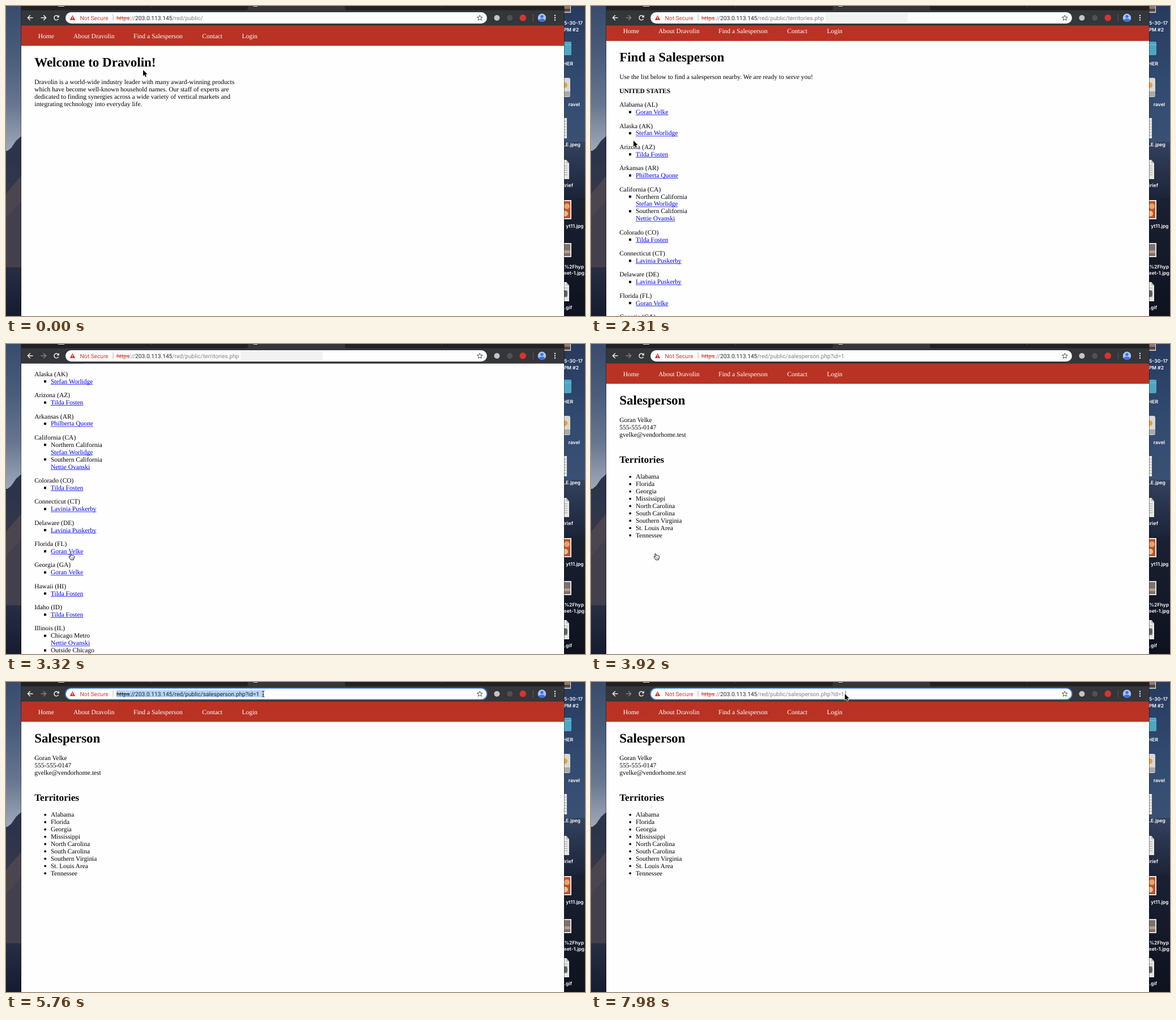
These frames come from a looping animation (1022 by 548 pixels, 8 s). An HTML page with a canvas:

```html
<!DOCTYPE html>
<html lang="en">
<head>
<meta charset="utf-8">
<title>Sales site</title>
<style>
html, body { margin: 0; width: 100%; height: 100%; overflow: hidden; background: #222b3f; }
canvas { display: block; width: 1022px; height: 548px; }
</style>
</head>
<body>
<canvas id="stage"></canvas>
<script>
const W = 1022, H = 548, LOOP = 8000;
const canvas = document.getElementById('stage');
const ctx = canvas.getContext('2d');
const dpr = window.devicePixelRatio || 1;
canvas.width = W * dpr;
canvas.height = H * dpr;

const SERIF = '"Liberation Serif", "Times New Roman", serif';
const UI = 'Roboto, sans-serif';
const LABEL = 'Inter, sans-serif';
const BODY = 11.49, LINE = 12.93, GAP = 11.49;
const FIRM = 'Dravolin';
const HOST = '203.0.113.145';
const A = 'Goran Velke', B = 'Stefan Worlidge', C = 'Tilda Fosten',
      D = 'Philberta Quone', E = 'Nettie Ovanski', F = 'Lavinia Puskerby';

// State, then pairs of person and optional district
const states = [
  ['Alabama (AL)', A], ['Alaska (AK)', B], ['Arizona (AZ)', C], ['Arkansas (AR)', D],
  ['California (CA)', B, 'Northern California', E, 'Southern California'],
  ['Colorado (CO)', C], ['Connecticut (CT)', F], ['Delaware (DE)', F],
  ['Florida (FL)', A], ['Georgia (GA)', A], ['Hawaii (HI)', C], ['Idaho (ID)', C],
  ['Illinois (IL)', E, 'Chicago Metro', E, 'Outside Chicago']
];
const areas = ['Alabama', 'Florida', 'Georgia', 'Mississippi', 'North Carolina',
  'South Carolina', 'Southern Virginia', 'St. Louis Area', 'Tennessee'];

// Pointer moves: start, end, number of held positions, target, shape on arrival
const moves = [
  { t: 150, end: 640, n: 4, x: 290.5, y: 62, shape: 'hand' },
  { t: 1690, end: 2020, n: 3, x: 75, y: 238, shape: 'arrow' },
  { t: 2810, end: 3320, n: 4, x: 116, y: 376, shape: 'hand' },
  { t: 4370, end: 4730, n: 3, x: 98, y: 93, shape: 'arrow' },
  { t: 5030, end: 5620, n: 5, x: 454, y: 21, shape: 'beam' },
  { t: 7250, end: 7980, n: 6, x: 448, y: 21, shape: 'arrow' }
];

function pointer(t) {
  let p = { x: 242, y: 113, shape: 'arrow' };
  for (const m of moves) {
    if (t < m.t) break;
    const step = (m.end - m.t) / (m.n - 1);
    const k = Math.min(m.n, Math.floor((t - m.t) / step + 1e-6) + 1) / m.n;
    const e = k * k * (3 - 2 * k);
    p = {
      x: p.x + (m.x - p.x) * e,
      y: p.y + (m.y - p.y) * e,
      shape: k === 1 ? m.shape : p.shape === 'beam' ? 'beam' : 'arrow'
    };
  }
  return p;
}

function rect(x, y, w, h, color) {
  ctx.fillStyle = color;
  ctx.fillRect(x, y, w, h);
}

function pill(x, y, w, h, r, color) {
  ctx.beginPath();
  ctx.roundRect(x, y, w, h, r);
  ctx.fillStyle = color;
  ctx.fill();
}

function dot(x, y, r, color) {
  ctx.beginPath();
  ctx.arc(x, y, r, 0, 7);
  ctx.fillStyle = color;
  ctx.fill();
}

function poly(points, color, line) {
  ctx.beginPath();
  for (let i = 0; i < points.length; i += 2) ctx.lineTo(points[i], points[i + 1]);
  ctx.closePath();
  if (color) { ctx.fillStyle = color; ctx.fill(); }
  if (line) { ctx.strokeStyle = line; ctx.stroke(); }
}

function stroke(path, color, width) {
  ctx.strokeStyle = color;
  ctx.lineWidth = width;
  ctx.stroke(new Path2D(path));
}

function text(s, x, y, font, color = '#000', align = 'left') {
  ctx.font = font;
  ctx.textAlign = align;
  ctx.fillStyle = color;
  ctx.fillText(s, x, y);
  return ctx.measureText(s).width;
}

function serif(s, x, y, color, size = BODY, weight = '') {
  return text(s, x, y, `${weight} ${size}px ${SERIF}`, color);
}

function fade(x, y, w, h, ...colors) {
  const g = ctx.createLinearGradient(0, y, 0, y + h);
  colors.forEach((c, i) => g.addColorStop(i / (colors.length - 1), c));
  rect(x, y, w, h, g);
}

function drawDoc(y) {
  poly([980, y, 989, y, 994, y + 6, 994, y + 34, 980, y + 34], '#e6e6e3');
  poly([989, y, 994, y + 6, 989, y + 6], '#bdbdbb');
  for (let i = 10; i < 30; i += 4) rect(985, y + i, 6, 1, '#a9aaa9');
}

function drawDesktop() {
  fade(0, 0, 27, 260, '#394c6d', '#4a5c7b', '#667690', '#a2abba');
  fade(0, 256, 27, 76, '#2b344a', '#34384a');
  poly([0, 258, 9, 251, 18, 238, 27, 230, 27, 275, 0, 275], '#2b344a');
  poly([0, 332, 27, 300, 27, 462, 0, 468], '#4b4550');
  poly([0, 375, 27, 345, 27, 462, 0, 468], '#433f4c');
  fade(0, 462, 27, 86, '#272d42', '#161c30');

  fade(985, 0, 37, 260, '#273a5e', '#314a70', '#3b5275');
  fade(985, 240, 37, 100, '#33425f', '#1c2438');
  fade(985, 340, 37, 208, '#1a2133', '#0e121e');

  rect(980, 0, 17, 12, '#e8e5e1');
  rect(980, 0, 16, 11, '#8d7770');
  rect(985, 5, 11, 4, '#4d4242');
  pill(975, 63, 23, 24, 2, '#4da7c4');
  rect(975, 68, 23, 1, '#76c3d8');
  pill(972, 127, 24, 34, 3, '#d9d8d2');
  rect(985, 151, 11, 9, '#a9aaa8');
  dot(986, 140, 5, '#e7a13c');
  rect(978, 198, 12, 36, '#e8e9e7');
  for (let y = 203; y < 230; y += 5) rect(985, y, 4, 1, '#a8aaac');
  drawDoc(272);
  rect(975, 343, 23, 34, '#ece8e2');
  rect(975, 345, 21, 30, '#c0522b');
  dot(990, 354, 5, '#e9a36b');
  dot(987, 367, 5, '#e1c08f');
  rect(975, 419, 23, 25, '#e4e2df');
  rect(975, 421, 21, 21, '#7b716f');
  rect(985, 432, 11, 5, '#b79a8a');
  drawDoc(488);
  pill(983, 503, 8, 11, 3, '#5c6065');

  const labels = [['5-30-17', 1018, 33], ['PM #2', 1011, 44.5], ['HER', 1001, 104.5],
    ['ravel', 1013, 176.5], ['LE.jpeg', 1014, 248], ['Brief', 1001, 320],
    ['yt11.jpg', 1019.5, 391.5], ['%2Fhyp', 1020, 463.5], ['eet-1.jpg', 1021, 475], ['.gif', 999, 535.5]];
  for (const [s, x, y] of labels) text(s, x, y, `600 8.6px ${LABEL}`, '#fff', 'right');

  // Hairline shadow around the window
  rect(26, 0, 1, H, 'rgba(0,0,0,.4)');
  rect(985, 0, 1, H, 'rgba(0,0,0,.4)');
}

function drawNav() {
  rect(27, 34, 958, 36.4, '#ba3223');
  const items = [['Home', 56.7], ['About ' + FIRM, 119], ['Find a Salesperson', 225],
    ['Contact', 346.3], ['Login', 416.4]];
  for (const [s, x] of items) serif(s, x, 57, '#fff');
}

function heading(s) {
  serif(s, 50.2, 106.9, '#000', 22.98, 'bold');
}

function lines(list, x, y) {
  list.forEach((s, i) => serif(s, x, y + i * LINE));
}

function drawHome() {
  heading(`Welcome to ${FIRM}!`);
  lines([`${FIRM} is a world-wide industry leader with many award-winning products`,
    'which have become well-known household names. Our staff of experts are',
    'dedicated to finding synergies across a wide variety of vertical markets and',
    'integrating technology into everyday life.'], 50.2, 137.8);
}

function link(s, y) {
  const w = serif(s, 78.9, y, '#0000ee');
  rect(78.9, y + 1.1, w, 0.8, '#0000ee');
}

function drawTerritories() {
  heading('Find a Salesperson');
  serif('Use the list below to find a salesperson nearby. We are ready to serve you!', 50.2, 137.8);
  serif('UNITED STATES', 50.2, 162.2, '#000', BODY, 'bold');
  let y = 186.8;
  for (const [name, ...rows] of states) {
    serif(name, 50.2, y);
    y += LINE;
    for (let i = 0; i < rows.length; i += 2) {
      rect(67, y - 5.6, 4, 4, '#000');
      if (rows[i + 1]) {
        serif(rows[i + 1], 78.9, y);
        y += LINE;
      }
      link(rows[i], y);
      y += LINE;
    }
    y += GAP;
  }
}

function drawSalesperson() {
  heading('Salesperson');
  lines([A, '555-555-0147', 'gvelke@vendorhome.test'], 50.2, 137.8);
  serif('Territories', 50.2, 209.6, '#000', 17.24, 'bold');
  lines(areas, 78.9, 238.4);
  areas.forEach((_, i) => dot(69.2, 234.8 + i * LINE, 1.9, '#000'));
}

function drawPage(t) {
  ctx.save();
  ctx.beginPath();
  ctx.rect(27, 34, 958, 514);
  ctx.clip();
  rect(27, 34, 958, 514, '#fefefe');
  const onList = t >= 1240 && t < 3920;
  const scroll = !onList || t < 2310 ? 0 : t < 2460 ? 8.6 : 167.3;
  ctx.translate(0, -scroll);
  drawNav();
  if (t < 1240) drawHome();
  else if (onList) drawTerritories();
  else drawSalesperson();
  ctx.restore();
  if (t >= 2460 && t < 3150) {
    ctx.globalAlpha = t < 2810 ? 1 : t < 2980 ? 0.5 : 0.2;
    pill(978, 71, 5, 106, 2.5, '#c2c2c2');
    ctx.globalAlpha = 1;
  }
}

function drawUrl(t) {
  const file = t < 1240 ? '' : t < 3920 ? 'territories.php' : 'salesperson.php?id=1';
  const focus = t >= 5620;
  const all = focus && t < 5900;
  const part = (t >= 6200 && t < 6650) || (t >= 6950 && t < 7250);
  pill(105, 11, 744, 20, 10, '#fefefe');
  if (focus) {
    ctx.beginPath();
    ctx.roundRect(105, 11, 744, 20, 10);
    ctx.strokeStyle = '#4a86e0';
    ctx.lineWidth = 1.6;
    ctx.stroke();
  }
  if (t >= 1240 && t < 3920) rect(414, 12, 145, 18, '#f2f2f2');

  poly([117.5, 16.3, 122.3, 25, 112.7, 25], '#d6382c');
  rect(117, 19, 1, 3, '#fff');
  rect(117, 23, 1, 1, '#fff');
  const font = `10.2px ${UI}`;
  text('Not Secure', 130.6, 24.6, font, '#d23a30');
  rect(188.5, 15, 1, 11, '#c9a5a2');

  if (all) rect(195, 14.5, 260, 12.5, '#b4d5fa');
  if (part) rect(195, 14.5, 249, 12.5, '#b4d5fa');
  const dark = all || part;
  const tint = c => dark ? '#1d2127' : c;
  let x = 195;
  const put = (s, c) => { x += text(s, x, 24.6, font, c); };
  put('https', tint('#cf4237'));
  rect(195, 20.7, x - 195, 1, tint('#cf4237'));
  put('://', tint('#808186'));
  put(HOST, '#25272b');
  const tail = '/red/public/' + file;
  if (part) {
    put(tail.slice(0, -1), '#1d2127');
    put('1', '#808186');
  } else put(tail, tint('#808186'));
  if (focus && !dark) rect(449, 15, 0.8, 12, '#555');
}

function drawBrowser(t) {
  rect(27, 0, 958, 34.6, '#35363a');
  pill(27, 0, 400, 7.5, [0, 0, 4, 0], '#202124');
  pill(598, 0, 387, 7.5, [0, 0, 0, 4], '#202124');
  rect(255, 0, 1, 2, '#4b4c50');
  rect(769, 0, 1, 2, '#4b4c50');
  rect(92, 0, 11, 1, '#dcdcdc');
  if (t < 1090 || t >= 1390) rect(437, 0, 7, 1, '#dcdcdc');

  ctx.lineCap = 'butt';
  stroke('M47.5 20.8H38.8M42.8 16.4L38.4 20.8L42.8 25.2', '#eceded', 1.5);
  stroke('M61.5 20.8H70.2M66.2 16.4L70.6 20.8L66.2 25.2', t < 1240 ? '#eceded' : '#808185', 1.5);
  ctx.beginPath();
  ctx.arc(89, 20.8, 4, 0.5, 5.6);
  ctx.strokeStyle = '#eceded';
  ctx.stroke();
  poly([93.8, 15.8, 93.8, 20.2, 89.4, 20.2], '#eceded');

  drawUrl(t);

  const star = [];
  for (let i = 0; i < 10; i++) {
    const r = i % 2 ? 2.2 : 5, a = i * Math.PI / 5;
    star.push(836.3 + r * Math.sin(a), 21.2 - r * Math.cos(a));
  }
  ctx.lineWidth = 1;
  poly(star, null, '#4c4f54');

  dot(866.5, 21, 5, '#c3c4c5');
  dot(889.3, 21, 5, '#505155');
  dot(912.3, 20.8, 5.8, '#d7342f');
  rect(930, 15, 1, 12, '#5a5b60');
  ctx.save();
  ctx.beginPath();
  ctx.arc(946, 20.8, 7.2, 0, 7);
  ctx.clip();
  rect(938, 13, 16, 16, '#a9c4f5');
  dot(946, 18.6, 2.7, '#3c6fdc');
  pill(940.7, 22.6, 10.6, 8, 4, '#3c6fdc');
  ctx.restore();
  for (let i = -1; i < 2; i++) dot(969, 20.8 + i * 4, 1.2, '#eceded');
}

function drawPointer({ x, y, shape }) {
  ctx.save();
  ctx.translate(x, y);
  ctx.lineJoin = 'round';
  if (shape === 'arrow') {
    ctx.lineWidth = 1.5;
    const body = [0, 0, 0, 10.8, 2.5, 8.5, 4.1, 12.3, 5.9, 11.5, 4.3, 7.8, 7.6, 7.8];
    poly(body, null, '#fff');
    poly(body, '#000');
  } else if (shape === 'hand') {
    const hand = 'M-3.3 -4.6C-3.3 -6 -1.5 -6 -1.3 -4.6L-.7 -1.8C-.3 -2.8 1 -2.6 1.2 -1.7' +
      'C1.6 -2.5 2.8 -2.2 3 -1.3C3.5 -1.9 4.6 -1.5 4.6 -.5C4.8 2 4.2 3.2 3.4 4.2V5.6H-1.8' +
      'C-2.4 3.6 -3.6 2.6 -4.7 .8C-5.2 -.4 -3.8 -.9 -3 .3L-2.5 .8Z';
    ctx.fillStyle = '#fff';
    ctx.fill(new Path2D(hand));
    stroke(hand, '#111', 1);
    stroke('M-.3 1.4V3.7M1.3 1.4V3.7M2.8 1.4V3.7', '#111', 0.6);
  } else {
    const beam = 'M-2.3 -5.3Q0 -5.3 0 -3.6V3.8Q0 5.5 -2.3 5.5M2.3 -5.3Q0 -5.3 0 -3.6M0 3.8Q0 5.5 2.3 5.5M-1.2 1.6H1.2';
    stroke(beam, '#fff', 2);
    stroke(beam, '#111', 1);
  }
  ctx.restore();
}

function draw(t) {
  ctx.setTransform(dpr, 0, 0, dpr, 0, 0);
  ctx.textRendering = 'geometricPrecision';
  drawDesktop();
  drawPage(t);
  drawBrowser(t);
  drawPointer(pointer(t));
}

const start = performance.now();
function tick() {
  draw((performance.now() - start) % LOOP);
  requestAnimationFrame(tick);
}
tick();
</script>
</body>
</html>
```
